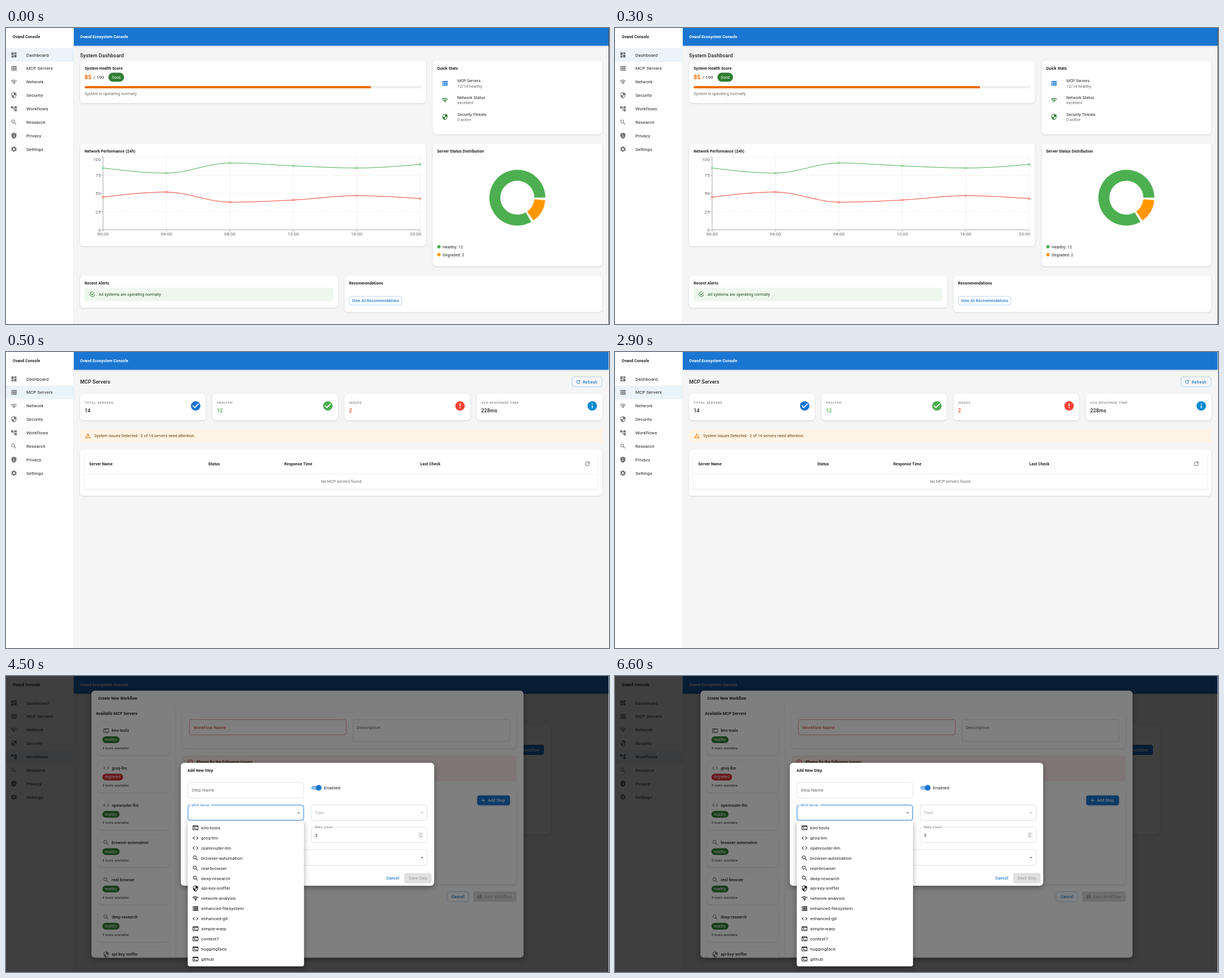
These frames come from a looping animation (1066x525 px, 8000 ms). An HTML page:

```html
<!DOCTYPE html>
<html lang="en">
<head>
<meta charset="utf-8">
<title>Dashboard tour</title>
<style>
html, body { margin: 0; width: 100%; height: 100%; overflow: hidden; background: #f5f5f5; }
svg { display: block; width: 1066px; height: 525px; }
text { font-family: Roboto, Arial, sans-serif; letter-spacing: .01em; white-space: pre; }
.b { font-weight: 600; }
.m { font-weight: 500; }
.btn { font-weight: 500; letter-spacing: .028em; }
.cap { letter-spacing: .033em; }
.over { letter-spacing: .083em; }
.mid { text-anchor: middle; }
.end { text-anchor: end; }
.card { filter: drop-shadow(0 1px 1.8px rgba(0,0,0,.13)); }
.pop { filter: drop-shadow(0 3px 5px rgba(0,0,0,.35)); }
</style>
</head>
<body>
<svg id="stage" viewBox="0 0 1066 525"></svg>
<script>
const INK = 'rgba(0,0,0,.87)', GRAY = 'rgba(0,0,0,.6)', ICON = 'rgba(0,0,0,.54)', FAINT = 'rgba(0,0,0,.26)';
const EDGE = 'rgba(0,0,0,.23)', BLUE = '#1976d2', GREEN = '#4caf50', RED = '#f44336', ORANGE = '#ed6c02';
const DARK_GREEN = '#2e7d32', DARK_RED = '#d32f2f';

// Icons on a 24-unit grid
const disc = 'M12 2C6.48 2 2 6.48 2 12s4.48 10 10 10 10-4.48 10-10S17.52 2 12 2z';
const shield = 'M12 1 3 5v6c0 5.55 3.84 10.74 9 12 5.16-1.26 9-6.45 9-12V5l-9-4z';
const icons = {
  dashboard: 'M3 13h8V3H3v10zm0 8h8v-6H3v6zm10 0h8V11h-8v10zm0-18v6h8V3h-8z',
  storage: 'M2 20h20v-4H2v4zm2-3h2v2H4v-2zM2 4v4h20V4H2zm4 3H4V5h2v2zm-4 7h20v-4H2v4zm2-3h2v2H4v-2z',
  network: 'M15.9 5c-.17 0-.32.09-.41.23l-.07.15-5.18 11.65c-.16.29-.26.61-.26.96 0 1.11.9 2.01 2.01 2.01.96 0 1.77-.68 1.96-1.59L16.4 5.5c0-.28-.22-.5-.5-.5zM1 9l2 2c2.88-2.88 6.79-4.08 10.53-3.62l1.19-2.68C9.89 3.84 4.74 5.27 1 9zm20 2 2-2c-1.64-1.64-3.55-2.82-5.59-3.57l-.53 2.82c1.5.62 2.9 1.53 4.12 2.75zm-4 4 2-2c-.8-.8-1.7-1.42-2.66-1.89l-.55 2.92c.42.27.83.59 1.21.97zM5 13l2 2c1.13-1.13 2.56-1.79 4.03-2l1.28-2.88c-2.63-.08-5.3.87-7.31 2.88z',
  security: shield + 'm0 10.99h7c-.53 4.12-3.28 7.79-7 8.94V12H5V6.3l7-3.11v8.8z',
  privacy: shield + 'm-1 6h2v2h-2V7zm0 4h2v6h-2v-6z',
  tree: 'M22 11V3h-7v3H9V3H2v8h7V8h2v10h4v3h7v-8h-7v3h-2V8h2v3z',
  search: 'M15.5 14h-.79l-.28-.27C15.41 12.59 16 11.11 16 9.5 16 5.91 13.09 3 9.5 3S3 5.91 3 9.5 5.91 16 9.5 16c1.61 0 3.09-.59 4.23-1.57l.27.28v.79l5 4.99L20.49 19l-4.99-5zm-6 0C7.01 14 5 11.99 5 9.5S7.01 5 9.5 5 14 7.01 14 9.5 11.99 14 9.5 14z',
  check: disc + 'm-2 15-5-5 1.41-1.41L10 14.17l7.59-7.59L19 8l-9 9z',
  error: disc + 'm1 15h-2v-2h2v2zm0-4h-2V7h2v6z',
  info: disc + 'm1 15h-2v-6h2v6zm0-8h-2V7h2v2z',
  errorLine: disc + 'M12 20c-4.42 0-8-3.58-8-8s3.58-8 8-8 8 3.58 8 8-3.58 8-8 8zM11 15h2v2h-2zm0-8h2v6h-2z',
  warning: 'M12 5.99 19.53 19H4.47L12 5.99M12 2 1 21h22L12 2zm1 14h-2v2h2v-2zm0-6h-2v4h2v-4z',
  done: 'M20 12A8 8 0 1 1 14.2 4.31L15.77 2.74A10 10 0 1 0 22 12M7.91 10.08 6.5 11.5 11 16 21 6 19.59 4.58 11 13.17z',
  refresh: 'M17.65 6.35C16.2 4.9 14.21 4 12 4c-4.42 0-7.99 3.58-7.99 8s3.57 8 7.99 8c3.73 0 6.84-2.55 7.73-6h-2.08c-.82 2.33-3.04 4-5.65 4-3.31 0-6-2.69-6-6s2.69-6 6-6c1.66 0 3.14.69 4.22 1.78L13 11h7V4l-2.35 2.35z',
  terminal: 'M20 4H4c-1.11 0-2 .9-2 2v12c0 1.1.89 2 2 2h16c1.1 0 2-.9 2-2V6c0-1.1-.89-2-2-2zm0 14H4V8h16v10zm-2-1h-6v-2h6v2zM7.5 17l-1.41-1.41L8.67 13l-2.59-2.59L7.5 9l4 4-4 4z',
  code: 'M9.4 16.6 4.8 12l4.6-4.6L8 6l-6 6 6 6 1.4-1.4zm5.2 0 4.6-4.6-4.6-4.6L16 6l6 6-6 6-1.4-1.4z',
  add: 'M19 13h-6v6h-2v-6H5v-2h6V5h2v6h6v2z',
  save: 'M17 3H5c-1.11 0-2 .9-2 2v14c0 1.1.89 2 2 2h14c1.1 0 2-.9 2-2V7l-4-4zm-5 16c-1.66 0-3-1.34-3-3s1.34-3 3-3 3 1.34 3 3-1.34 3-3 3zm3-10H5V5h10v4z',
  down: 'M7 10l5 5 5-5z',
  up: 'M7 14l5-5 5 5z'
};

// Shape helpers; boxes are given by their left, top, right and bottom edges
const text = (x, y, str, size = 7, fill = INK, cls = '') =>
  `<text x="${x}" y="${y}" font-size="${size}" fill="${fill}" class="${cls}">${str}</text>`;
const box = (l, t, r, b, fill, rad = 0, extra = '') =>
  `<rect x="${l}" y="${t}" width="${r - l}" height="${b - t}" rx="${rad}" fill="${fill}" ${extra}/>`;
const card = (l, t, r, b, rad = 6) => box(l, t, r, b, '#fff', rad, 'class="card"');
const outline = (l, t, r, b, color = EDGE, w = .5, rad = 4) =>
  box(l, t, r, b, 'none', rad, `stroke="${color}" stroke-width="${w}"`);
const circle = (x, y, r, fill, extra = '') => `<circle cx="${x}" cy="${y}" r="${r}" fill="${fill}" ${extra}/>`;
const path = (d, fill, extra = '') => `<path d="${d}" fill="${fill}" ${extra}/>`;
const line = (d, color, extra = '') => path(d, 'none', `stroke="${color}" stroke-width=".5" ${extra}`);
const place = (x, y, size, body) =>
  `<g transform="translate(${x - size / 2} ${y - size / 2}) scale(${size / 24})">${body}</g>`;
const gear = color =>
  circle(12, 12, 5.5, 'none', `stroke="${color}" stroke-width="4"`) +
  circle(12, 12, 8.4, 'none', `stroke="${color}" stroke-width="3" stroke-dasharray="4.4" stroke-dashoffset="-2.2"`);
const icon = (name, x, y, color = ICON, size = 12) =>
  place(x, y, size, name === 'gear' ? gear(color) : path(icons[name], color, 'fill-rule="evenodd"'));
const title = (x, y, str) => text(x, y, str, 7, INK, 'b');

const menu = [['dashboard', 'Dashboard'], ['storage', 'MCP Servers'], ['network', 'Network'], ['security', 'Security'],
  ['tree', 'Workflows'], ['search', 'Research'], ['privacy', 'Privacy'], ['gear', 'Settings']];

const shell = active =>
  box(0, 0, 1066, 525, '#f5f5f5') +
  box(119.5, 0, 1065.5, 31.5, BLUE, 0, 'class="card"') +
  text(131, 18.2, 'Ovand Ecosystem Console', 7, '#fff', 'b') +
  box(0, 0, 119.5, 525, '#fff') + box(119, 0, 119.5, 525, '#e0e0e0') +
  title(12, 18.2, 'Ovand Console') +
  menu.map(([name, label], i) => {
    const y = 47.7 + 23.88 * i;
    return (i === active ? box(0, y - 12, 119, y + 12, '#ebf3fb') : '') +
      icon(name, 14, y) + text(36, y + 2.8, label, 8);
  }).join('');

// Smooth curve that never overshoots its points
function curve(pts) {
  const n = pts.length - 1, h = pts[1][0] - pts[0][0];
  const s = pts.slice(1).map((p, i) => (p[1] - pts[i][1]) / h);
  const t = pts.map((_, i) => {
    const a = s[i - 1], b = s[i];
    return i && i < n ? (Math.sign(a) + Math.sign(b)) * Math.min(Math.abs(a), Math.abs(b), Math.abs(a + b) / 4) : 0;
  });
  t[0] = (3 * s[0] - t[1]) / 2;
  t[n] = (3 * s[n - 1] - t[n - 1]) / 2;
  return 'M' + pts[0] + pts.slice(1).map(([x, y], i) => {
    const [px, py] = pts[i];
    return `C${px + h / 3} ${py + t[i] * h / 3} ${x - h / 3} ${y - t[i + 1] * h / 3} ${x} ${y}`;
  }).join('');
}

function chart() {
  const X = i => 171.6 + 112.08 * i, Y = v => 358 - 1.29 * v, hours = [0, 1, 2, 3, 4, 5];
  const dash = 'stroke-dasharray="1.5"';
  let out = '';
  for (const v of [0, 25, 50, 75, 100]) {
    out += line(`M${X(0)} ${Y(v)}H${X(5)}`, '#ccc', dash) + line(`M${X(0) - 3} ${Y(v)}h3`, '#666') +
      text(167.5, (v === 100 ? 232.7 : Y(v)) + 2.9, v, 8, '#666', 'end');
  }
  for (const i of hours) {
    out += line(`M${X(i)} 229V358`, '#ccc', dash) + line(`M${X(i)} 358v3`, '#666') +
      text(i === 5 ? 724 : X(i), 368, String(i * 4).padStart(2, '0') + ':00', 8, '#666', 'mid');
  }
  out += line(`M${X(0)} 229V358H${X(5)}`, '#666');
  for (const [color, data] of [[GREEN, [85, 78, 92, 88, 85, 90]], [RED, [45, 52, 38, 41, 47, 43]]]) {
    const pts = data.map((v, i) => [X(i), Y(v)]);
    out += path(curve(pts), 'none', `stroke="${color}"`) +
      pts.map(([x, y]) => circle(x, y, 1.5, '#fff', `stroke="${color}"`)).join('');
  }
  return out;
}

// Ring segment between two angles, counted anticlockwise from the right
function segment(from, to, color) {
  const at = (r, deg) => `${904 + r * Math.cos(deg * Math.PI / 180)} ${301 - r * Math.sin(deg * Math.PI / 180)}`;
  const big = +(to - from > 180);
  return path(`M${at(49.75, from)}A49.75 49.75 0 ${big} 0 ${at(49.75, to)}L${at(29.85, to)}` +
    `A29.85 29.85 0 ${big} 1 ${at(29.85, from)}Z`, color, 'stroke="#fff" stroke-width=".5"');
}

const stat = (y, name, color, label, value) =>
  icon(name, 776, y, color) + text(798, y - 2.2, label) + text(798, y + 7.6, value, 7, GRAY);

const dashboard = () => shell(0) +
  text(131, 52, 'System Dashboard', 9, INK, 'm') +
  card(131, 57.5, 742.5, 133) +
  title(139, 73.8, 'System Health Score') +
  text(139, 91, '85', 10.4, ORANGE, 'b') + text(154.5, 90, '/ 100', 8) +
  box(181, 79.3, 208.7, 95.3, DARK_GREEN, 8) + text(187, 89.5, 'Good', 6.47, '#fff') +
  box(139, 103, 734.5, 107, '#eee', 2) + path('M141 103H645V107H141a2 2 0 0 1 0-4z', ORANGE) +
  text(139, 118.6, 'System is operating normally', 7, GRAY) +
  card(754.5, 57.5, 1054, 188.5) + title(762, 73.8, 'Quick Stats') +
  stat(98, 'storage', BLUE, 'MCP Servers', '12/14 healthy') +
  stat(127.8, 'network', DARK_GREEN, 'Network Status', 'excellent') +
  stat(157.7, 'security', DARK_GREEN, 'Security Threats', '0 active') +
  card(131, 205, 742.5, 387) + title(139, 220.8, 'Network Performance (24h)') + chart() +
  card(754.5, 205, 1054, 422.5) + title(762, 220.8, 'Server Status Distribution') +
  segment(0, 300, GREEN) + segment(305, 355, '#ff9800') +
  circle(765.3, 388, 3, GREEN) + text(772, 390.6, 'Healthy: 12') +
  circle(765.3, 402, 3, '#ff9800') + text(772, 404.5, 'Degraded: 2') +
  card(131, 439, 587, 496) + title(139, 455, 'Recent Alerts') +
  box(139, 460.8, 578.7, 484.5, '#edf7ed', 4) + icon('done', 152.5, 472.3, DARK_GREEN, 11) +
  text(164, 475.1, 'All systems are operating normally', 7, '#1e4620') +
  card(598.5, 439, 1054, 503.8) + title(606.5, 455, 'Recommendations') +
  outline(606.8, 476, 699.8, 491.5, 'rgba(25,118,210,.6)') +
  text(611.5, 486.1, 'View All Recommendations', 6.47, BLUE, 'btn') +
  box(1065.2, 0, 1066, 525, '#333');

const counter = (i, label, value, name, color, fill = color) => {
  const x = 131 + 233.7 * i;
  return card(x, 74, x + 222, 121) + text(x + 8, 91.7, label, 5.97, GRAY, 'over') +
    text(x + 8, 106.8, value, 9, fill, 'm') + icon(name, x + 204.3, 95.5, color, 20);
};

const servers = () => shell(1) +
  text(131, 56.2, 'MCP Servers', 9, INK, 'm') +
  outline(1000.7, 44, 1053.8, 61.8, 'rgba(25,118,210,.6)') +
  icon('refresh', 1011.5, 53, BLUE, 10) + text(1019.7, 55.5, 'Refresh', 7, BLUE, 'btn') +
  counter(0, 'TOTAL SERVERS', '14', 'check', BLUE, INK) +
  counter(1, 'HEALTHY', '12', 'check', GREEN) +
  counter(2, 'ISSUES', '2', 'error', RED) +
  counter(3, 'AVG RESPONSE TIME', '228ms', 'info', '#0288d1', INK) +
  box(131, 136.8, 1054, 160.3, '#fff4e5', 4) + icon('warning', 144.7, 148.6, ORANGE, 11) +
  text(156, 151.1, 'System Issues Detected - 2 of 14 servers need attention.', 7, '#663c00') +
  card(131, 173, 1054, 255) + card(139, 180.5, 1046.3, 243, 4) +
  [[147, 'Server Name'], [357.5, 'Status'], [492, 'Response Time'], [732.5, 'Last Check']]
    .map(([x, label]) => title(x, 200.7, label)).join('') +
  icon('refresh', 1027.8, 198.2) + line('M139 216.3H1046.3', '#ddd') +
  text(592.7, 232, 'No MCP servers found', 7, GRAY, 'mid') +
  box(1065.5, 0, 1066, 525, '#fff');

const list = [['terminal', 'kiro-tools', 4], ['code', 'groq-llm', 3], ['code', 'openrouter-llm', 3],
  ['search', 'browser-automation', 5], ['search', 'real-browser', 4], ['search', 'deep-research', 3],
  ['security', 'api-key-sniffer', 3], ['network', 'network-analysis'], ['storage', 'enhanced-filesystem'],
  ['code', 'enhanced-git'], ['terminal', 'simple-warp'], ['terminal', 'context7'],
  ['terminal', 'huggingface'], ['terminal', 'github']];

const serverCard = ([name, label, tools], i) => {
  const y = 97 + 66.17 * i, bad = i === 1;
  return card(163, y - 13, 288, y + 43.3) + icon(name, 177, y) + text(187, y + 2.4, label, 7, INK, 'm') +
    box(170.5, y + 10, bad ? 207 : 200.7, y + 22, bad ? DARK_RED : DARK_GREEN, 6) +
    text(174.6, y + 18.3, bad ? 'degraded' : 'healthy', 6.47, '#fff') +
    text(170.5, y + 33, tools + ' tools available', 5.97, INK, 'cap');
};

const shade = box(0, 0, 1065.5, 525, 'rgba(0,0,0,.5)');

const workflowDialog = () =>
  box(151, 26, 915, 499.5, '#fff', 6, 'class="pop"') +
  title(163, 42.2, 'Create New Workflow') + title(159, 69.4, 'Available MCP Servers') +
  line('M300.3 53V499.5', '#ddd') +
  '<clipPath id="panel"><rect x="151" y="53" width="149" height="446.5"/></clipPath>' +
  `<g clip-path="url(#panel)">${list.slice(0, 7).map(serverCard).join('')}</g>` +
  card(312, 65, 902.7, 128) +
  outline(324.2, 77.3, 601.5, 104.5, DARK_RED) + text(331, 93.9, 'Workflow Name', 8, DARK_RED) +
  outline(613.5, 77.3, 890.8, 116.3) + text(620.3, 93.9, 'Description', 8, GRAY) +
  box(312, 140.8, 902.7, 186.7, '#fdeded', 4) + icon('errorLine', 326, 153, DARK_RED, 11) +
  text(337, 155.3, 'Please fix the following issues:', 7, '#5f2120', 'b') +
  card(312, 199.5, 902.7, 370) +
  box(833, 211.7, 891, 229.2, BLUE, 4, 'class="card"') + icon('add', 844, 220.5, '#fff', 10) +
  text(852, 223, 'Add Step', 7, '#fff', 'btn') +
  outline(779.7, 382.5, 818, 400.4, 'rgba(25,118,210,.6)') + text(787.5, 394, 'Cancel', 7, BLUE, 'btn') +
  box(826, 382.3, 902.7, 400.5, 'rgba(0,0,0,.12)', 4) + icon('save', 837.2, 391.4, FAINT, 10) +
  text(845, 394, 'Save Workflow', 7, FAINT, 'btn');

const stepDialog = () =>
  box(309, 154, 757, 372, '#fff', 6, 'class="pop"') + title(321, 169.8, 'Add New Step') +
  outline(321.6, 188.8, 526.4, 216.3) + text(328.3, 205.3, 'Step Name', 8, GRAY) +
  box(539.7, 194.8, 557, 201.8, BLUE, 3.5, 'opacity=".5"') + circle(552.8, 198.3, 5, BLUE, 'class="card"') +
  text(562, 201, 'Enabled', 8) +
  outline(321.8, 228.9, 526.2, 256.1, BLUE, 1) + box(326, 228, 363, 230, '#fff') +
  text(328.3, 230.6, 'MCP Server', 5.97, BLUE) + icon('up', 517.3, 242.5) +
  outline(539.6, 228.8, 744.4, 256.3, FAINT) + text(546, 245.3, 'Tool', 8, 'rgba(0,0,0,.38)') +
  icon('down', 735.5, 242.5, FAINT) +
  outline(539.6, 267.9, 744.4, 295.5) + box(544, 267, 580, 269, '#fff') +
  text(546, 270, 'Retry Count', 5.97, GRAY) + text(546, 284.8, '3', 8) +
  box(729, 277, 737.5, 287, '#eee') +
  path('M731.5 281l1.7-2 1.7 2M731.5 283.2l1.7 2 1.7-2', 'none', 'stroke="#777" stroke-width=".7"') +
  outline(321.6, 308, 744.4, 335.5) + icon('down', 735.5, 322) +
  text(672.5, 361.2, 'Cancel', 7, BLUE, 'btn') +
  box(704, 349.5, 752.5, 367.8, '#e0e0e0', 4) + text(712, 361.2, 'Save Step', 7, FAINT, 'btn') +
  box(321.3, 256.8, 526.8, 515, '#fff', 4, 'class="pop"') +
  list.map(([name, label], i) => {
    const y = 269.3 + 17.9 * i;
    return icon(name, 335, y, INK) + text(345, y + 2.7, label, 8);
  }).join('');

const workflows = () => shell(4) +
  card(221, 86, 963, 281) + line('M221 109H963', '#ddd') +
  box(880, 122, 951, 140, BLUE, 4) + text(943, 133.6, 'Create Workflow', 7, '#fff', 'btn end') +
  shade + workflowDialog() + shade + stepDialog() +
  box(1065.5, 0, 1066, 525, '#fff');

const stage = document.getElementById('stage');
stage.innerHTML = [dashboard, servers, workflows].map(scene => `<g>${scene()}</g>`).join('');
const scenes = [...stage.children], starts = [0, 500, 4500], LOOP = 8000;
const begin = performance.now();

function draw() {
  const t = (performance.now() - begin) % LOOP;
  const current = starts.filter(s => s <= t).length - 1;
  scenes.forEach((g, i) => g.style.display = i === current ? '' : 'none');
  requestAnimationFrame(draw);
}
draw();
</script>
</body>
</html>
```
